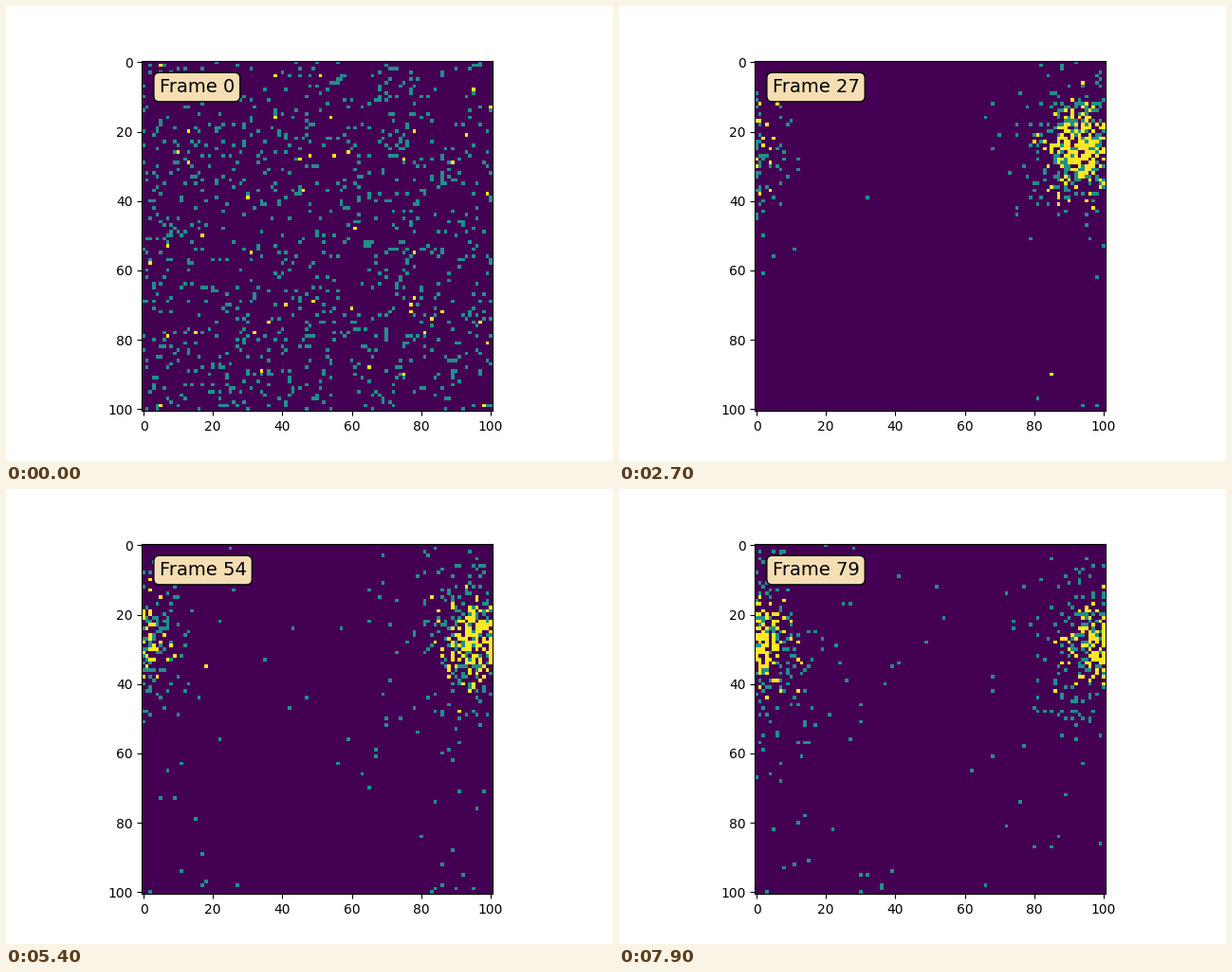
A matplotlib script for the animation above (8000 ms loop, 640 by 480 pixels).

```python
import numpy as np
import matplotlib.pyplot as plt
from matplotlib.animation import FuncAnimation

SIZE, COUNT, FRAMES, INTERVAL = 101, 1000, 80, 100
GROUPED, MERGED = 12, 27       # when groups and the one swarm have formed
LEADERS, FREE = 160, 550       # particles from FREE on stack onto leaders

rng = np.random.default_rng(12)


def delta(a, b):
    """Shortest step from a to b on the wrapped field."""
    return (b - a + SIZE / 2) % SIZE - SIZE / 2


def nearest(points, centres):
    gaps = delta(points[:, None], centres[None])
    return np.linalg.norm(gaps, axis=2).argmin(axis=1)


start = rng.uniform(-.5, SIZE - .5, (COUNT, 2))
groups = rng.uniform(0, SIZE, (26, 2))
home = groups[nearest(start, groups)]
lead = np.arange(COUNT)
lead[FREE:] = nearest(start[FREE:], start[:LEADERS])

# Leaders come first and stay closest to the middle
rank = np.sort(np.abs(rng.normal(size=(COUNT, 1))), axis=0)
rank[LEADERS:] = rng.permutation(rank[LEADERS:])
near, side_a, side_b = rng.normal(size=(3, COUNT, 2))


def ramp(frame, begin, end):
    return np.clip((frame - begin) / (end - begin), 0, 1)


def swarm_offset(frame):
    """Circling offsets whose outer tail widens with time."""
    reach = np.exp((.6 + .4 * ramp(frame, MERGED, 60)) * rank)
    phase = frame * np.pi / 26
    return (4.2, 6) * reach * (side_a * np.cos(phase) + side_b * np.sin(phase))


def positions(frame):
    late = ramp(frame, MERGED, FRAMES)
    middle = np.array([93 + 7 * late, 25 + 4 * late])
    merge = ramp(frame, GROUPED, MERGED)
    turn = merge * np.pi / 2
    target = home + delta(home, middle) * merge
    target += 1.4 * np.exp(.5 * rank) * near * np.cos(turn)
    target += swarm_offset(frame) * np.sin(turn)
    target += np.random.default_rng(500 + frame).normal(0, .6, (COUNT, 2))
    return start + delta(start, target[lead]) * ramp(frame, 0, GROUPED)


def field(frame):
    cells = np.rint(positions(frame)).astype(int) % SIZE
    grid = np.zeros((SIZE, SIZE), int)
    np.add.at(grid, (cells[:, 1], cells[:, 0]), 1)
    return np.minimum(grid, 2)


fig, ax = plt.subplots(figsize=(6.4, 4.8), dpi=100)
image = ax.imshow(field(0), cmap="viridis", vmin=0, vmax=2)
label = ax.text(.05, .95, "Frame 0", transform=ax.transAxes, fontsize=14,
                va="top", bbox=dict(boxstyle="round", facecolor="wheat"))


def update(frame):
    image.set_data(field(frame))
    label.set_text(f"Frame {frame}")
    return image, label


anim = FuncAnimation(fig, update, frames=FRAMES, interval=INTERVAL,
                     repeat=True, repeat_delay=0)
plt.show()
```
